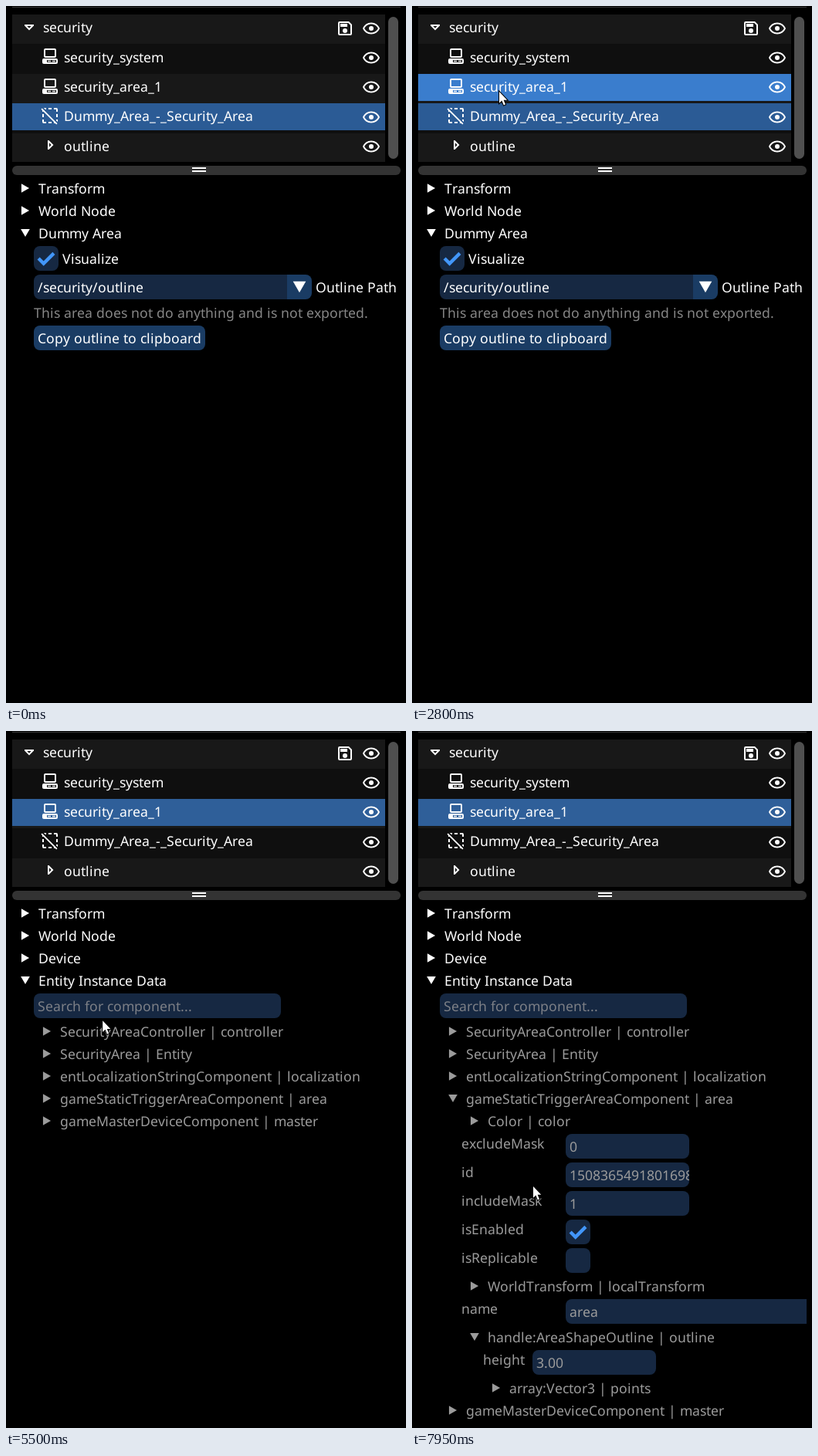
Write an HTML page with a canvas that moves like this. It is 518x903 px and loops after 8000 ms.

```html
<!DOCTYPE html>
<html lang="en">
<head>
<meta charset="utf-8">
<title>Scene editor</title>
<style>
  html, body { margin: 0; width: 100%; height: 100%; overflow: hidden; background: #000; }
  canvas { display: block; }
</style>
</head>
<body>
<canvas id="stage" width="518" height="903"></canvas>
<script>
const ctx = document.getElementById('stage').getContext('2d');
const LOOP = 8000, TICK = 50;

const WHITE = '#fff', GRAY = '#9b9b9b', DIM = '#868686';
const FRAME = '#162842', BUTTON = '#1a3c64', ACCENT = '#4296fa', PRESSED = '#0f87fa', HOVER = '#3578c8';

const ICONS = {
  eye: 'M12,9a3,3 0 1,1 0,6a3,3 0 1,1 0,-6M12,4.5C17,4.5 21.27,7.61 23,12C21.27,16.39 17,19.5 12,19.5C7,19.5 2.73,16.39 1,12C2.73,7.61 7,4.5 12,4.5M3.18,12C4.83,15.36 8.24,17.5 12,17.5C15.76,17.5 19.17,15.36 20.82,12C19.17,8.64 15.76,6.5 12,6.5C8.24,6.5 4.83,8.64 3.18,12Z',
  save: 'M17,3H5A2,2 0 0,0 3,5V19A2,2 0 0,0 5,21H19A2,2 0 0,0 21,19V7ZM19,19H5V5H16.17L19,7.83ZM12,12a3,3 0 1,0 0,6a3,3 0 1,0 0,-6M6,6H15V10H6Z',
  device: 'M6,2A2,2 0 0,0 4,4V12A2,2 0 0,0 6,14H18A2,2 0 0,0 20,12V4A2,2 0 0,0 18,2ZM6,4H18V12H6ZM4,15A2,2 0 0,0 2,17V20A2,2 0 0,0 4,22H20A2,2 0 0,0 22,20V17A2,2 0 0,0 20,15ZM8,17H20V20H8ZM9,17.75V19.25H13V17.75ZM15,17.75V19.25H19V17.75Z',
  area: 'M.5,3.77L1.78,2.5L21.5,22.22L20.23,23.5L18.73,22H17V20.27L3.73,7H2V5.27ZM4,2H7V4H5.82L3.83,2ZM20,2A2,2 0 0,1 22,4V7H20V4H17V2ZM20,17H22V20.17L20,18.18ZM4,22A2,2 0 0,1 2,20V17H4V20H7V22ZM10,2H14V4H10ZM10,20H14V22H10ZM20,10H22V14H20ZM2,10H4V14H2Z',
  open: 'M18,9V10.5L12,16.5L6,10.5V9ZM12,13.67L14.67,11H9.33Z',
  closed: 'M9,6H10.5L16.5,12L10.5,18H9ZM13.67,12L11,9.33V14.67Z'
};
for (const name in ICONS) ICONS[name] = new Path2D(ICONS[name]);
const POINTER = new Path2D('M0,0V14.8L3.4,11.6L5.8,17.4L8,16.4L5.6,10.8H10.2Z');

const TREE = [
  ['security', 'open', 18, 48],
  ['security_system', 'device', 45, 75],
  ['security_area_1', 'device', 45, 75],
  ['Dummy_Area_-_Security_Area', 'area', 45, 75],
  ['outline', 'closed', 45, 75]
];

// start, end, target x, target y, time warp, sideways bow
const MOVES = [
  [2000, 2800, 113, 111, 0.9, 0],
  [3550, 4150, 125, 319, 0.6, 11],
  [5250, 6050, 123, 476.5, 0.78, 1],
  [6350, 6500, 184, 480.5, 1, 0],
  [7550, 7950, 157, 590, 0.9, 0]
];

// halo on, halo off, press, release
const CLICKS = [
  [1300, 1400, 1300, 1400],
  [3100, 3250, 3100, 3250],
  [4700, 4800, 4700, 4850],
  [7000, 7100, 7050, 7150]
];

let mouse, pressed;

function pointerAt(t) {
  const enter = Math.max(0, 1 - t / 800) ** 2.4;
  let x = 113 + 24 * enter, y = 440 + 465 * enter;
  for (const [start, end, toX, toY, warp, bow] of MOVES) {
    if (t <= start) break;
    const u = Math.min(1, (t - start) / (end - start)) ** warp;
    const f = u * u * (3 - 2 * u);
    x += (toX - x) * f + bow * Math.sin(Math.PI * f);
    y += (toY - y) * f;
  }
  return { x, y };
}

const isOver = (x, y, w, h) =>
  mouse.x >= x && mouse.x < x + w && mouse.y >= y && mouse.y < y + h;

function box(x, y, w, h, color, radius = 0) {
  ctx.fillStyle = color;
  ctx.beginPath();
  ctx.roundRect(x, y, w, h, radius);
  ctx.fill();
}

// Glyphs advance by whole pixels, as in the editor's bitmap font
function text(str, x, baseline, color = WHITE) {
  ctx.fillStyle = color;
  for (const glyph of str) {
    ctx.fillText(glyph, x, baseline);
    x += Math.round(ctx.measureText(glyph).width);
  }
}

function icon(name, x, y) {
  ctx.save();
  ctx.translate(x, y);
  ctx.fillStyle = WHITE;
  ctx.fill(ICONS[name], 'evenodd');
  ctx.restore();
}

function arrow(x, y, r, down, color) {
  const a = 0.75 * r, b = 0.866 * r;
  ctx.fillStyle = color;
  ctx.beginPath();
  for (const [p, q] of [[a, 0], [-a, b], [-a, -b]])
    down ? ctx.lineTo(x + q, y + p) : ctx.lineTo(x + p, y + q);
  ctx.fill();
}

function header(label, y, level = 0, open = false) {
  const x = 42 + 28 * level, color = level ? GRAY : WHITE;
  if (isOver(8, y, 503, 24)) box(8, y, 503, 24, pressed ? ACCENT : HOVER);
  arrow(x - 17, y + 12, 6.72, open, color);
  text(label, x, y + 19, color);
}

function checkbox(x, y, checked, color = FRAME) {
  box(x, y, 32, 32, color, 8);
  if (!checked) return;
  ctx.strokeStyle = ACCENT;
  ctx.lineWidth = 4.4;
  ctx.beginPath();
  ctx.moveTo(x + 6.1, y + 16);
  ctx.lineTo(x + 12.7, y + 22.6);
  ctx.lineTo(x + 25.9, y + 9.4);
  ctx.stroke();
}

function field(x, y, w, value, color = GRAY, radius = 8) {
  ctx.save();
  ctx.beginPath();
  ctx.rect(x, y, w, 32);
  ctx.clip();
  box(x, y, w, 32, FRAME, radius);
  text(value, x + 5, y + 23, color);
  ctx.restore();
}

function drawTree(selected) {
  box(8, 1, 503, 1, '#3a3a3a');
  TREE.forEach(([label, symbol, iconX, textX], i) => {
    const at = top => Math.round(top + 38.4 * i);
    const y = at(11), light = i % 2 === 0;
    box(8, y, 483, at(49.4) - y, light ? '#181818' : '#0f0f0f');
    if (isOver(8, y, 483, 35)) box(8, y, 483, 35, pressed ? ACCENT : '#3a7dcd');
    else if (i === selected) box(8, y, 483, 35, light ? '#2f5f99' : '#2b5b95');
    icon(symbol, iconX, at(14.8));
    text(label, textX, at(34.2));
    icon('eye', 461, at(16.6));
  });
  icon('save', 427, 17);
  box(8, 202, 483, 2, '#000');
  box(495, 14, 13, 184, '#4f4f4f', 6.5);
  box(8, 207, 503, 12, '#333', 6);
  box(241, 209, 18, 2, WHITE);
  box(241, 213, 18, 2, WHITE);
}

function drawDummyPanel() {
  header('Dummy Area', 282, 0, true);
  checkbox(36, 311, true, isOver(36, 311, 110, 32) ? BUTTON : FRAME);
  text('Visualize', 73, 334);

  const overCombo = isOver(36, 348, 360, 32);
  box(36, 348, 328, 32, overCombo ? BUTTON : FRAME, [8, 0, 0, 8]);
  box(364, 348, 32, 32, overCombo ? ACCENT : BUTTON, [0, 8, 8, 0]);
  arrow(380, 364, 9.6, true, WHITE);
  text('/security/outline', 41, 371);
  text('Outline Path', 401, 371);

  text('This area does not do anything and is not exported.', 36, 404, DIM);
  const overButton = isOver(36, 414, 222, 32);
  box(36, 414, 222, 32, overButton ? (pressed ? PRESSED : ACCENT) : BUTTON, 8);
  text('Copy outline to clipboard', 41, 437);
}

function drawTrigger() {
  header('Color | color', 493, 2);
  ['excludeMask', 'id', 'includeMask', 'isEnabled', 'isReplicable'].forEach((label, i) =>
    text(label, 64, 541 + 37 * i, GRAY));
  field(199, 522, 160, '0');
  field(199, 559, 160, '15083654918016987');
  field(199, 596, 160, '1');
  checkbox(199, 633, true);
  checkbox(199, 670, false);
  header('WorldTransform | localTransform', 707, 2);
  text('name', 64, 755, GRAY);
  field(199, 736, 312, 'area', GRAY, [8, 0, 0, 8]);
  header('handle:AreaShapeOutline | outline', 773, 2, true);
  text('height', 92, 821, GRAY);
  field(156, 802, 160, '3.00');
  header('array:Vector3 | points', 839, 3);
}

function drawDevicePanel(dataOpen, triggerOpen) {
  header('Device', 282);
  header('Entity Instance Data', 311, 0, dataOpen);
  if (!dataOpen) return;
  field(36, 340, 320, 'Search for component...', '#7c7f86');
  header('SecurityAreaController | controller', 377, 1);
  header('SecurityArea | Entity', 406, 1);
  header('entLocalizationStringComponent | localization', 435, 1);
  header('gameStaticTriggerAreaComponent | area', 464, 1, triggerOpen);
  if (triggerOpen) drawTrigger();
  header('gameMasterDeviceComponent | master', triggerOpen ? 868 : 493, 1);
}

function drawPointer(halo) {
  ctx.save();
  ctx.translate(mouse.x, mouse.y);
  ctx.lineWidth = 2;
  ctx.strokeStyle = '#000';
  ctx.stroke(POINTER);
  ctx.fillStyle = WHITE;
  ctx.fill(POINTER);
  if (halo) {
    ctx.fillStyle = 'rgba(235,235,0,.55)';
    ctx.beginPath();
    ctx.arc(0, -0.5, 15, 0, 2 * Math.PI);
    ctx.fill();
  }
  ctx.restore();
}

function draw(t) {
  const [, deviceSelected, dataOpen, triggerOpen] = CLICKS.map(click => t >= click[3]);
  mouse = pointerAt(t);
  pressed = CLICKS.some(c => t >= c[2] && t < c[3]);

  ctx.fillStyle = '#000';
  ctx.fillRect(0, 0, 518, 903);
  ctx.font = '17.62px "Noto Sans", sans-serif';
  ctx.textRendering = 'geometricPrecision';

  drawTree(deviceSelected ? 2 : 3);
  header('Transform', 224);
  header('World Node', 253);
  if (deviceSelected) drawDevicePanel(dataOpen, triggerOpen);
  else drawDummyPanel();
  drawPointer(CLICKS.some(c => t >= c[0] && t < c[1]));
}

const begin = performance.now();
function loop() {
  const t = (performance.now() - begin) % LOOP;
  draw(Math.floor(t / TICK) * TICK);
  requestAnimationFrame(loop);
}
loop();
</script>
</body>
</html>
```
